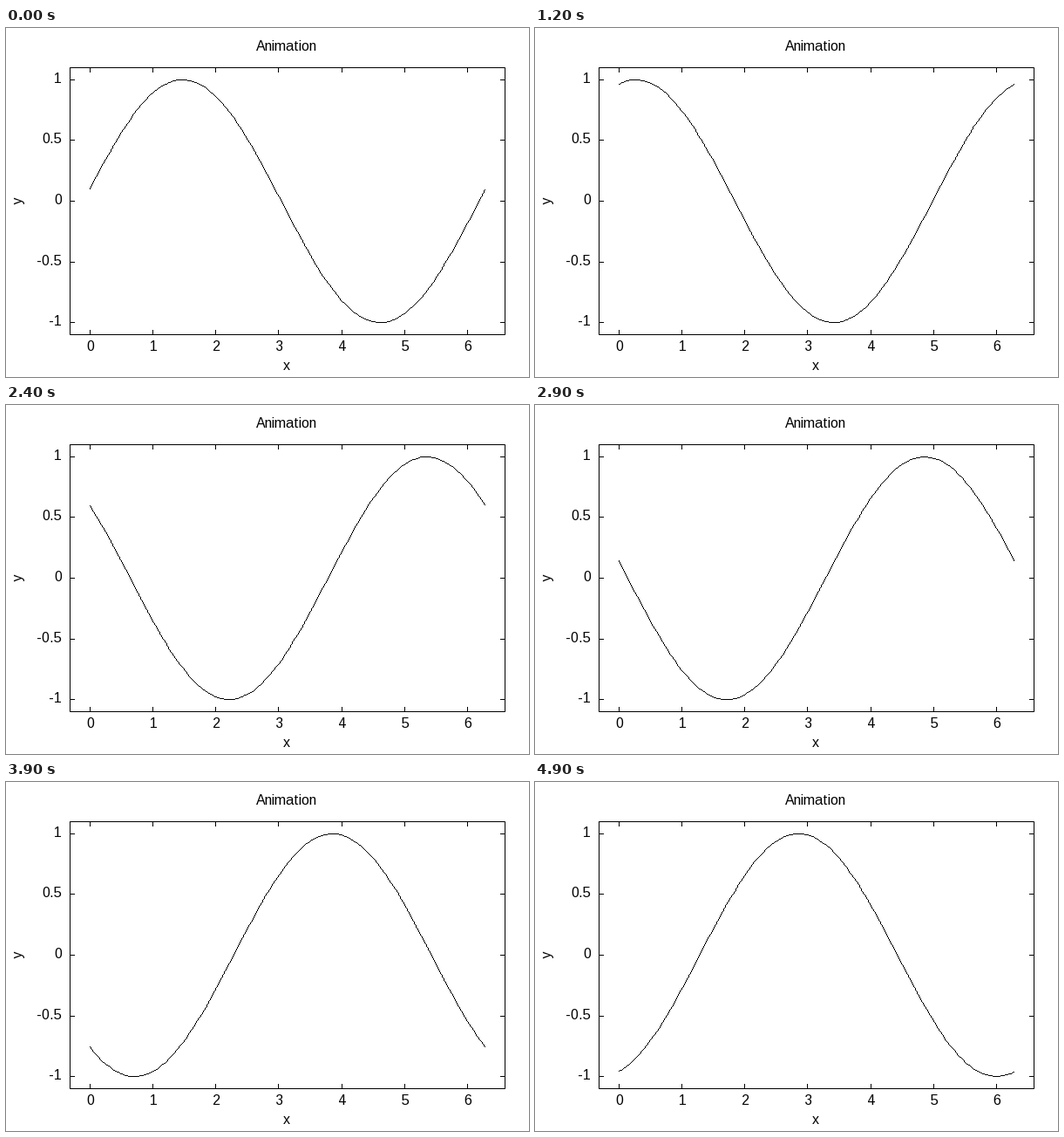
These frames come from a looping animation (600 by 400 pixels, 5 s). A matplotlib script:

```python
import numpy as np
import matplotlib.pyplot as plt
from matplotlib.animation import FuncAnimation

WIDTH, HEIGHT, DPI = 600, 400, 100
LEFT, RIGHT, TOP, BOTTOM = 73, 572, 45, 351
X_END = 6.28
TICK = 5
PX = 72 / DPI  # one pixel in points
FRAMES, INTERVAL = 50, 100

plt.rcParams.update({
    "font.family": "Liberation Sans",
    "font.size": 16 * PX,
    "text.hinting_factor": 1,  # whole-pixel letter advances
    "path.simplify": False,
})

fig = plt.figure(figsize=(WIDTH / DPI, HEIGHT / DPI), dpi=DPI, facecolor="white")
ax = fig.add_axes([0, 0, 1, 1])
ax.set_xlim(0, WIDTH)
ax.set_ylim(HEIGHT, 0)
ax.axis("off")


def to_px(x):
    return LEFT + (x / X_END + 0.05) * (RIGHT - LEFT) / 1.1


def to_py(y):
    return TOP + (1.1 - y) * (BOTTOM - TOP) / 2.2


def stroke(xs, ys, cap="projecting"):
    """Draw a line exactly one pixel wide, without snapping."""
    return ax.plot(xs, ys, color="black", lw=PX, snap=False,
                   solid_capstyle=cap, solid_joinstyle="miter")[0]


def rule(xs, ys):
    """Draw a straight line through pixel centres."""
    stroke(np.array(xs) + 0.5, np.array(ys) + 0.5)


def label(x, y, text, ha="center", rotation=0):
    ax.text(x, y, text, ha=ha, va="baseline", rotation=rotation,
            rotation_mode="anchor", color="black")


def line_pixels(xs, ys):
    """Pixels of a polyline, one per step along each segment's longer side."""
    points = np.rint(np.column_stack([xs, ys]))
    pixels = [points[:1]]
    for start, end in zip(points, points[1:]):
        steps = int(np.abs(end - start).max())
        t = np.arange(1, steps + 1)[:, None] / max(steps, 1)
        pixels.append(np.rint(start + t * (end - start)))
    return np.concatenate(pixels).T


def pixel_dashes(px, py):
    """Turn each pixel into a separate one-pixel dash."""
    gap = np.full_like(px, np.nan)
    return (np.column_stack([px, px + 1, gap]).ravel(),
            np.column_stack([py + 0.5, py + 0.5, gap]).ravel())


rule([LEFT, RIGHT, RIGHT, LEFT, LEFT], [TOP, TOP, BOTTOM, BOTTOM, TOP])

for value in range(7):
    px = round(to_px(value))
    rule([px, px], [BOTTOM, BOTTOM - TICK])
    rule([px, px], [TOP, TOP + TICK])
    label(px + 1, 370, str(value))

for value in (-1, -0.5, 0, 0.5, 1):
    py = round(to_py(value))
    rule([LEFT, LEFT + TICK], [py, py])
    rule([RIGHT, RIGHT - TICK], [py, py])
    label(64, py + 4, f"{value:g}", ha="right")

label(322, 26, "Animation")
label(322, 392, "x")
label(18, 198, "y", rotation=90)

xs = np.linspace(0, X_END, 100)
curve = stroke([], [], cap="butt")


def update(frame):
    phase = (frame + 1) / 10
    pixels = line_pixels(to_px(xs), to_py(np.sin(xs + phase)))
    curve.set_data(*pixel_dashes(*pixels))
    return (curve,)


anim = FuncAnimation(fig, update, frames=FRAMES, interval=INTERVAL,
                     repeat=True, repeat_delay=0)
plt.show()
```
